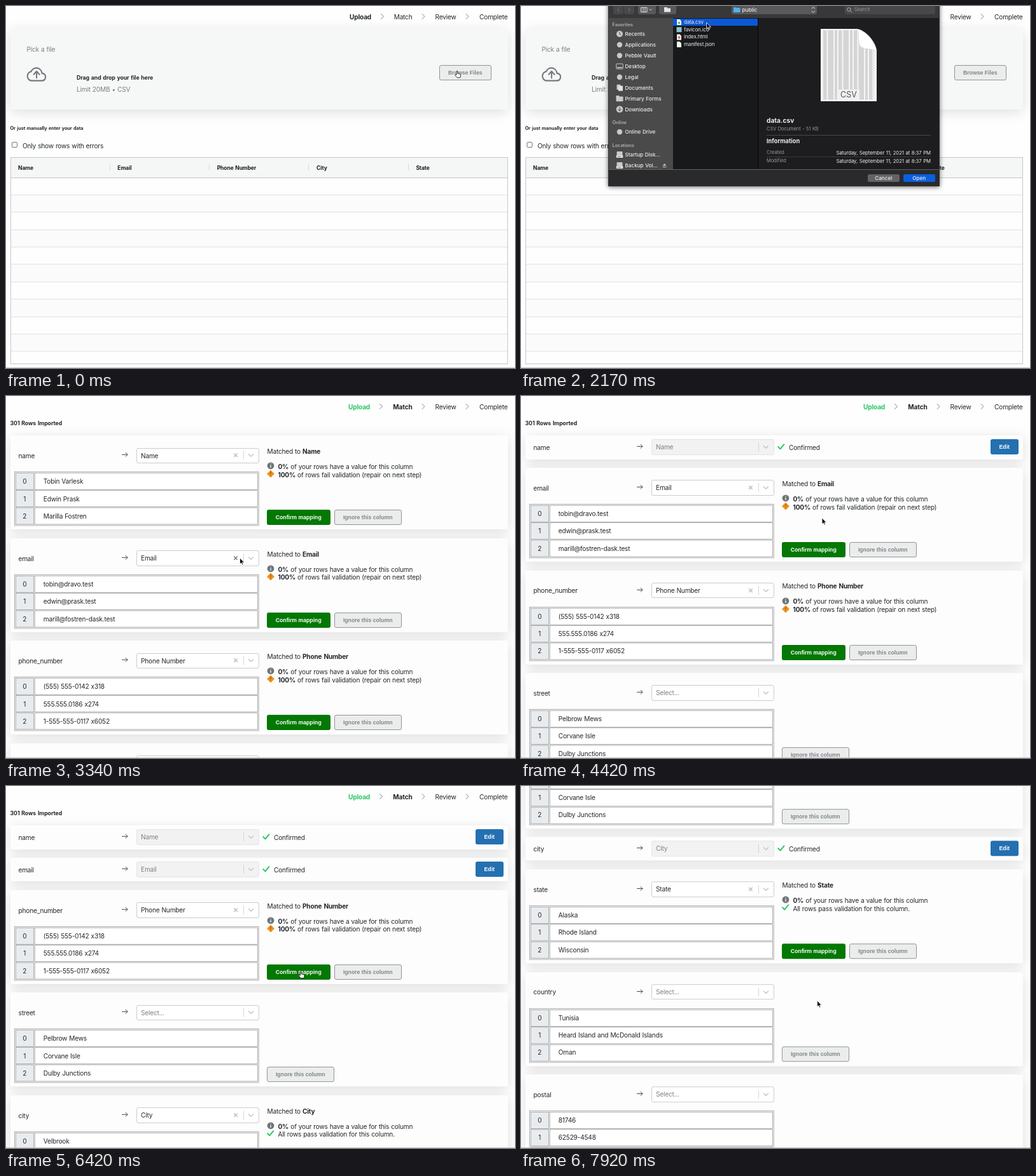
An HTML page for the animation above (8 s loop, 800 by 570 pixels).

```html
<!DOCTYPE html>
<html lang="en">
<head>
<meta charset="utf-8">
<title>CSV import</title>
<style>
html, body { margin: 0; width: 100%; height: 100%; overflow: hidden; background: #fefefe; }
div, svg { position: absolute; box-sizing: border-box; }
svg { left: 0; top: 0; overflow: visible; fill: none; }
#stage { left: 0; top: 0; width: 800px; height: 570px; overflow: hidden; background: #fefefe;
  font: 10.15px/14px Inter, sans-serif; letter-spacing: -.02em; word-spacing: .04em; color: #23272b; }
.layer { left: 0; top: 0; width: 800px; height: 570px; }
.t { height: 14px; white-space: pre; }
.r { transform: translateX(-100%); }
.c { transform: translateX(-50%); }
b, .b { font-weight: 700; word-spacing: .08em; }
.s85 { font-size: 8.5px; letter-spacing: -.01em; font-weight: 700; word-spacing: .08em; color: #181d1f; }
.s87 { font-size: 8.7px; letter-spacing: -.005em; font-weight: 700; word-spacing: .08em; }
.s72 { font-size: 7.25px; letter-spacing: -.005em; font-weight: 700; word-spacing: .08em; }
.gray { color: #7b8084; }
.green { color: #2dc766; }
.panel { border-radius: 3px; background: #fdfdfd; box-shadow: 0 4px 20px rgba(0,0,0,.13); }
.btn { display: flex; align-items: center; justify-content: center; border-radius: 3px;
  font: 700 8.7px "Liberation Sans", Arial, sans-serif; letter-spacing: 0; word-spacing: 0; white-space: nowrap; }
.flat { background: #ebecec; border: 1px solid #909496; color: #80858a; }
.ok { background: #037803; color: #fff; }
.edit { background: #2470b0; color: #fff; }
.sel { border: 1px solid #ccc; border-radius: 3px; background: #fff; }
.off { background: #f2f2f2; border-color: #e4e4e4; }
.done .full, .card:not(.done) .brief { display: none; }
#dialog { color: #eee; font-size: 8px; letter-spacing: -.02em; }
.win { background: #2a2a2c; border: 1px solid #333335; box-shadow: 0 1px 7px rgba(0,0,0,.6); }
.side { background: #4a4a4b; }
.nav { font-size: 8.15px; letter-spacing: 0; font-weight: 500; }
.head { font-size: 7.3px; letter-spacing: 0; font-weight: 600; color: #b0b0b0; }
.meta { font-size: 7.4px; letter-spacing: 0; color: #98989c; }
.date { font-size: 7.75px; letter-spacing: -.01em; word-spacing: .06em; }
.kind { font-size: 12.5px; letter-spacing: 0; color: #555; }
.file { font-size: 10.2px; letter-spacing: 0; }
.info { font-size: 9.2px; letter-spacing: 0; }
.ctl { background: #59595b; border-radius: 3px; }
.dim { background: #48484a; }
.mac { display: flex; align-items: center; justify-content: center; border-radius: 2.5px;
  background: #636365; font-size: 8.2px; letter-spacing: 0; font-weight: 500; }
.picked .open { background: #0b5fe0; }
#dialog:not(.picked) .open { background: #3a3a3c; color: #77777a; }
#dialog:not(.picked) .pick { display: none; }
.idle .side { background: #262627; }
.idle .nav { color: #a9a9a9; }
</style>
</head>
<body>
<div id="stage"></div>
<script>
const box = (x, y, w, h, cls, html = '', css = '') =>
  `<div class="${cls}" style="left:${x}px;top:${y}px;width:${w}px;height:${h}px;${css}">${html}</div>`;
const fill = (x, y, w, h, color) => box(x, y, w, h, '', '', `background:${color}`);
const txt = (x, y, s, cls = '') => `<div class="t ${cls}" style="left:${x}px;top:${y - 7}px">${s}</div>`;
const svg = s => `<svg width="800" height="570">${s}</svg>`;
const line = (d, color, w = 1) =>
  `<path d="${d}" stroke="${color}" stroke-width="${w}" stroke-linecap="round" stroke-linejoin="round"/>`;
const dot = (x, y, r, color) => `<circle cx="${x}" cy="${y}" r="${r}" fill="${color}"/>`;
const rect = (x, y, w, h, color, r = 0) =>
  `<rect x="${x}" y="${y}" width="${w}" height="${h}" rx="${r}" fill="${color}"/>`;
const cell = (x, y, w, h, color = '#fff') =>
  `<rect x="${x}" y="${y}" width="${w}" height="${h}" fill="${color}" stroke="#8a8a8a" stroke-width=".7"/>`;
const check = (x, y) => line(`M${x - 4.5} ${y}l3.2 3.4 6-7.2`, '#2dc766', 2);

const steps = matching =>
  txt(matching ? 572 : 574, 17, 'Upload', 'r b' + (matching ? ' green' : '')) +
  txt(638.5, 17, 'Match', matching ? 'r b' : 'r') +
  txt(707.5, 17, 'Review', 'r') + txt(788.5, 17, 'Complete', 'r') +
  svg([matching ? 587.5 : 589.5, 654, 723].map(x => line(`M${x} 12.5l4 4-4 4`, '#777', .9)).join(''));

function uploadPage() {
  const heads = ['Name', 'Email', 'Phone Number', 'City', 'State'];
  let rows = '';
  for (let i = 0; i < 11; i++) {
    const y = 270 + i * 27.37;
    rows += fill(7, y, 781, Math.min(27.4, 563 - y), i % 2 ? '#fbfbfb' : '#fefefe');
    if (i) rows += fill(7, Math.round(y - .4), 781, 1, '#e1e1ea');
  }
  return steps(false) +
    box(6.5, 36, 782, 126.5, 'panel', '', 'background:#f6f7f7') +
    txt(32.5, 68, 'Pick a file', 'gray') +
    svg(`<g transform="translate(32.4 90.2) scale(1.307 1.44)">` +
      line('M19 19H6a5 5 0 0 1-.55-9.97A6.9 6.9 0 0 1 18.5 11a4 4 0 0 1 .5 8z', '#737a80', 1.6) +
      line('M12 16V9M8.6 12.2 12 8.8l3.4 3.4', '#737a80', 1.6) + '</g>') +
    txt(111, 113, 'Drag and drop your file here', 's87') +
    txt(111, 131, 'Limit 20MB • CSV', 'gray') +
    box(681, 93, 81.5, 24, 'btn flat', 'Browse Files') +
    txt(6.5, 192.5, 'Or just manually enter your data', 's72') +
    box(9, 214, 9, 9, '', '', 'border:1px solid #777;border-radius:2px;background:#fff') +
    txt(26, 219.5, 'Only show rows with errors') +
    rows + fill(7, 238, 781, 32, '#f5f6f6') + fill(7, 269.5, 781, 1, '#c3c8cb') +
    heads.map((h, i) => txt(19 + i * 156.35, 254.5, h, 's85') +
      fill(163 + i * 156.2, 249, 1, 10, '#d6d9db')).join('') +
    box(6.5, 238, 782, 325.5, '', '', 'border:1px solid #c3c8cb');
}

const arrow = y => line(`M182.5 ${y}h8.5m-3-3 3 3-3 3`, '#333', .9);

function select(y, value, disabled) {
  const m = y + 12;
  return box(205, y, 192.5, 24.5, 'sel' + (disabled ? ' off' : '')) +
    txt(212, m, value || 'Select...', disabled || !value ? 'gray' : '') +
    svg(line(`M373.5 ${m - 6.5}v13`, '#ccc', .8) + line(`M381.5 ${m - 1.5}l3.5 3.5 3.5-3.5`, '#c4c4c4', 1.4) +
      (value && !disabled
        ? `<path class="clear" d="M358.3 ${m - 2.7}l5.4 5.4m0-5.4-5.4 5.4" stroke="#bbb" stroke-width="1.4"/>` : ''));
}

function card([label, field, rows, fails]) {
  const rowY = i => 59.2 + i * 27.4;
  const table = svg(cell(13.3, 57.3, 383.9, 84.6) + rows.map((v, i) =>
    cell(15.2, rowY(i), 28.5, 26, '#e9ecef') + cell(45.2, rowY(i), 350.2, 26)).join('')) +
    rows.map((v, i) => txt(29.3, rowY(i) + 12.8, i, 'c') + txt(58.8, rowY(i) + 12.8, v)).join('');
  const status = field
    ? txt(410.5, 24.8, `Matched to <b>${field}</b>`) +
      txt(427.5, 48.8, '<b>0%</b> of your rows have a value for this column') +
      txt(427.5, 61.5, fails ? '<b>100%</b> of rows fail validation (repair on next step)'
        : 'All rows pass validation for this column.') +
      svg(dot(416, 47.8, 5.4, '#6e7579') + line('M416 47.3v3M416 45v.1', '#fff', 1.3) +
        (fails ? '<path d="M416 54.4l6 6-6 6-6-6z" fill="#f0931e"/>' + line('M416 57.6v3M416 63v.1', '#7a4a08', 1)
          : check(415.5, 60))) +
      box(410, 117, 99.5, 24, 'btn ok', 'Confirm mapping') +
      box(516, 117, 105.5, 24, 'btn flat', 'Ignore this column')
    : box(410, 117, 105.5, 24, 'btn flat', 'Ignore this column');
  const full = txt(19.5, 31.8, label) + svg(arrow(30.3)) + select(19.3, field) + table + status;
  const brief = txt(19.5, 18.7, label) + svg(arrow(17.3) + check(408.8, 18)) + select(6.2, field, true) +
    txt(421, 18.7, 'Confirmed') + box(738, 6, 43.5, 24.2, 'btn edit', 'Edit');
  return `<div class="card" style="left:0;width:800px"><div class="panel" style="left:6.5px;width:782px;height:100%"></div>
    <div class="full">${full}</div><div class="brief">${brief}</div></div>`;
}

// label, matched field, sample rows, fails validation, step at which it is confirmed
const cards = [
  ['name', 'Name', ['Tobin Varlesk', 'Edwin Prask', 'Marilla Fostren'], 1, 52],
  ['email', 'Email', ['tobin@dravo.test', 'edwin@prask.test', 'marill@fostren-dask.test'], 1, 65],
  ['phone_number', 'Phone Number', ['(555) 555-0142 x318', '555.555.0186 x274', '1-555-555-0117 x6052'], 1, 79],
  ['street', '', ['Pelbrow Mews', 'Corvane Isle', 'Dulby Junctions']],
  ['city', 'City', ['Velbrook', 'Port Ansdry', 'East Morvel'], 0, 92],
  ['state', 'State', ['Alaska', 'Rhode Island', 'Wisconsin']],
  ['country', '', ['Tunisia', 'Heard Island and McDonald Islands', 'Oman']],
  ['postal', '', ['81746', '62529-4548', '30417']]
];

const sheet = (x, y) => `<path d="M${x - 3.5} ${y - 4.5}h4.5l2.5 2.5v6.5h-7z" fill="#f4f4f4"/>`;

function sideIcon(kind, y) {
  const c = '#c9c9c9', x = 155;
  if (kind === 'dot') return dot(x, y, 4.2, c);
  if (kind === 'clock') return dot(x, y, 5, c) + line(`M${x} ${y - 3}v3l2 1.4`, '#4a4a4b');
  if (kind === 'down') return dot(x, y, 5.3, c) + line(`M${x} ${y - 3}v5.5m-2.3-2.2 2.3 2.3 2.3-2.3`, '#4a4a4b');
  if (kind === 'desk') return `<rect x="149.8" y="${y - 4}" width="10.4" height="8" rx="1" stroke="${c}"/>` + rect(151, y + 1, 8, 1.6, c);
  if (kind === 'docs') return rect(150.5, y - 5, 6, 8, c) + rect(153, y - 3, 7, 8, '#e2e2e2');
  if (kind === 'dir') return rect(149.5, y - 4.5, 5, 3, c, 1) + rect(149.5, y - 3.2, 11, 7.8, c, 1);
  return rect(150.5, y - 5, 9, 7, c, 1) + rect(149.7, y + 1, 10.6, 4, '#e2e2e2', 1) + line(`M152 ${y + 3}h5`, '#666', .8);
}

function filePreview() {
  const page = 'M471 36h55c10 2 5 18 10 26 4 6 18 3 23 9v79h-88z';
  let print = '';
  for (let i = 0; i < 56; i++)
    print += `<path d="M475 ${39 + i * 1.95}h80" stroke="#b0b0b0" stroke-width=".9" stroke-dasharray="${5 + i % 2} 2 ${9 - i % 2} 2 4 2"/>`;
  return svg(`<clipPath id="page"><path d="${page}"/></clipPath><path d="${page}" fill="#f5f5f5"/>
      <g clip-path="url(#page)">${print}${rect(498, 131, 34, 16, '#f0f0f0')}</g>
      <path d="M526 36c8 4 2 18 7 27 4 6 20 3 26 9 0-14-18-36-33-36z" fill="#fff" stroke="#c4c4c4" stroke-width=".5"/>`) +
    txt(515, 139.5, 'CSV', 'c kind') +
    txt(386, 180, 'data.csv', 'b file') +
    txt(386, 193.5, 'CSV Document - 51 KB', 'meta') + fill(386, 203, 258, 1, '#47474a') +
    txt(386, 213.2, 'Information', 'b info') +
    ['Created', 'Modified'].map((s, i) => txt(386, 230.8 + i * 13, s, 'meta') +
      txt(644, 230.8 + i * 13, 'Saturday, September 11, 2021 at 8:37 PM', 'date r')).join('') +
    fill(386, 237, 258, 1, '#3a3a3c');
}

function dialogBox() {
  const nav = [['Recents', 44, 'clock'], ['Applications', 61, 'dot'], ['Pebble Vault', 78, 'dot'],
    ['Desktop', 95, 'desk'], ['Legal', 112, 'dot'], ['Documents', 128.7, 'docs'], ['Primary Forms', 145.6, 'dir'],
    ['Downloads', 162.5, 'down'], ['Online Drive', 198.3, 'dot'], ['Startup Disk...', 234, 'disk'], ['Backup Vol...', 251, 'disk']];
  const files = ['data.csv', 'favicon.ico', 'index.html', 'manifest.json'];
  const toolbar = fill(138, -20, 519, 39, '#38383a') +
    box(145, -4, 16, 17, 'ctl dim') + box(162, -4, 16, 17, 'ctl dim') +
    box(184, -4, 28, 17, 'ctl') + box(217, -4, 27, 17, 'ctl') + box(331, -4, 134, 17, 'ctl') + box(509, -4, 142, 17, 'ctl dim') +
    svg(line('M154.5 3l-3 3 3 3M168.5 3l3 3-3 3', '#7d7d80') +
      line('M201.5 4.8l2 2 2-2M457 4l2.3-2.3L461.6 4M457 8l2.3 2.3L461.6 8', '#ddd') +
      line('M189 2.5h9v7h-9zM192 2.5v7M195 2.5v7', '#ddd') +
      rect(225, 2, 5, 3, '#e5e5e5') + rect(225, 3.5, 10, 6, '#e5e5e5') +
      rect(334, 2, 5, 3, '#3ba0dc', 1) + rect(334, 3, 10.5, 7, '#4fb4ec', 1) +
      line('M518.3 5.5a2.8 2.8 0 1 0-5.6 0 2.8 2.8 0 1 0 5.6 0M517.8 7.8l2.2 2.2', '#b5b5b5')) +
    txt(347.5, 6.3, 'public', 'nav') + txt(524, 6.3, 'Search', 'meta');
  return box(137, -20, 521, 304, 'win') + toolbar +
    box(138, 19, 101, 238, 'side') + fill(239, 19, 133, 238, '#18191b') + fill(372, 19, 1, 238, '#050505') +
    fill(373, 19, 284, 238, '#1d1d1f') + fill(138, 257, 519, 1, '#626264') +
    txt(143.5, 29.5, 'Favorites', 'head') + txt(143.5, 183.7, 'Online', 'head') + txt(143.5, 219.5, 'Locations', 'head') +
    nav.map(n => txt(163.5, n[1], n[0], 'nav')).join('') +
    svg(nav.map(n => sideIcon(n[2], n[1])).join('') + '<path d="M225.5 248l3 3.5h-6zM222.5 253h6v1h-6z" fill="#c4c4c4"/>') +
    box(239, 20, 132.5, 11, 'pick', '', 'background:#0c59d6') +
    files.map((f, i) => txt(256, 25 + i * 11.7, f)).join('') +
    svg(sheet(248.5, 25.5) + dot(248.5, 26.5, 1.6, '#5aa04a') + rect(244.5, 33.2, 8, 8, '#8fc4d4') +
      sheet(248.5, 49) + dot(248.5, 49.5, 2, '#e0714a') + sheet(248.5, 60.5)) +
    `<div class="pick">${filePreview()}</div>` +
    box(545, 264.5, 49.5, 12.5, 'mac', 'Cancel') + box(601, 264.5, 49.5, 12.5, 'mac open', 'Open');
}

const pointer = `<path id="arrow" d="M0 0V9.8L2.3 7.7 3.7 11 5.4 10.3 4 7.1H7z" fill="#111" stroke="#fff" stroke-width=".8"/>
  <path id="hand" d="M-.9 6.5V1c0-1.3 1.8-1.3 1.8 0V4.3l3.5 .8c1 .3 1.3 .9 1.2 1.9L5 10.8H0L-3 7.3c-.8-1 .5-2 1.3-1.3z" fill="#fff" stroke="#222" stroke-width=".9"/>`;

const $ = id => document.getElementById(id);
$('stage').innerHTML =
  `<div class="layer" id="upload">${uploadPage()}</div>
  <div class="layer" id="match">${steps(true)}${txt(6.5, 42.7, '301 Rows Imported', 's87')}${cards.map(card).join('')}</div>
  ${fill(0, 569, 800, 1, '#c8c8c8')}
  <div class="layer" id="dialog">${dialogBox()}</div>
  ${svg(`<g id="cursor">${pointer}</g>`)}`;
const cardEls = [...document.querySelectorAll('.card')];
const emailClear = cardEls[1].querySelector('.clear');

// Keys: step, values. One step is 1/12 s.
const cursorKeys = [
  [0, 709, 102, 1], [1, 709, 102, 1], [6, 630, 114, 1], [9, 450, 112, 1], [11, 366, 93, 1], [13, 363, 91, 1],
  [14, 363, 91, 0], [16, 363, 91, 0], [21, 335, 62, 0], [24, 291.5, 26, 0], [30, 291.5, 26, 0], [34, 322, 130, 0],
  [39, 367.5, 255, 0], [42, 367.5, 255, 0], [48, 455, 196, 1], [51, 461, 189, 1], [52, 464, 190, 0],
  [53, 473, 192, 0], [58, 469, 225, 0], [61, 461, 240, 1], [65, 461, 241, 0], [71, 463, 291, 1],
  [79, 463.5, 292, 0], [83, 464, 280, 0], [88, 464, 216, 1], [92, 464, 214, 0], [95, 465.5, 338, 0]];
const sheetKeys = [[11, -300], [12, -262], [13, -198], [14, -90], [15, -25], [16, 0], [28, 0], [29, -70], [30, -200], [31, -300]];
const scrollKeys = [[81, 0], [82, 10], [84, 110], [86, 220], [88, 280], [90, 295.8]];

function at(keys, n, col = 1) {
  const i = keys.findIndex(k => k[0] > n);
  if (i === 0) return keys[0][col];
  if (i < 0) return keys[keys.length - 1][col];
  const a = keys[i - 1], b = keys[i];
  return a[col] + (b[col] - a[col]) * (n - a[0]) / (b[0] - a[0]);
}

function show(n) {
  const matching = n >= 34;
  $('upload').style.display = matching ? 'none' : '';
  $('match').style.display = matching ? '' : 'none';
  $('match').style.transform = `translateY(${-at(scrollKeys, n)}px)`;
  let y = 62.3;
  cards.forEach((c, i) => {
    const done = n >= c[4], el = cardEls[i];
    el.classList.toggle('done', done);
    el.style.top = y + 'px';
    el.style.height = (done ? 37.3 : 148) + 'px';
    y += done ? 50.8 : 161.5;
  });
  emailClear.setAttribute('stroke', n >= 38 && n < 43 ? '#777' : '#bbb');

  const drop = at(sheetKeys, n), dialog = $('dialog');
  dialog.style.display = drop <= -300 ? 'none' : '';
  dialog.style.transform = `translateY(${drop}px)`;
  dialog.className = 'layer' + (n >= 25 ? ' picked' : '') + (n < 16 ? ' idle' : '');

  const hand = cursorKeys.filter(k => k[0] <= n).pop()[3];
  $('cursor').setAttribute('transform', `translate(${at(cursorKeys, n)} ${at(cursorKeys, n, 2)})`);
  $('hand').style.display = hand ? '' : 'none';
  $('arrow').style.display = hand ? 'none' : '';
}

let last = -1;
const start = performance.now();
function play() {
  const n = Math.floor((performance.now() - start) % 8000 * 12 / 1000);
  if (n !== last) show(last = n);
  requestAnimationFrame(play);
}
play();
</script>
</body>
</html>
```
